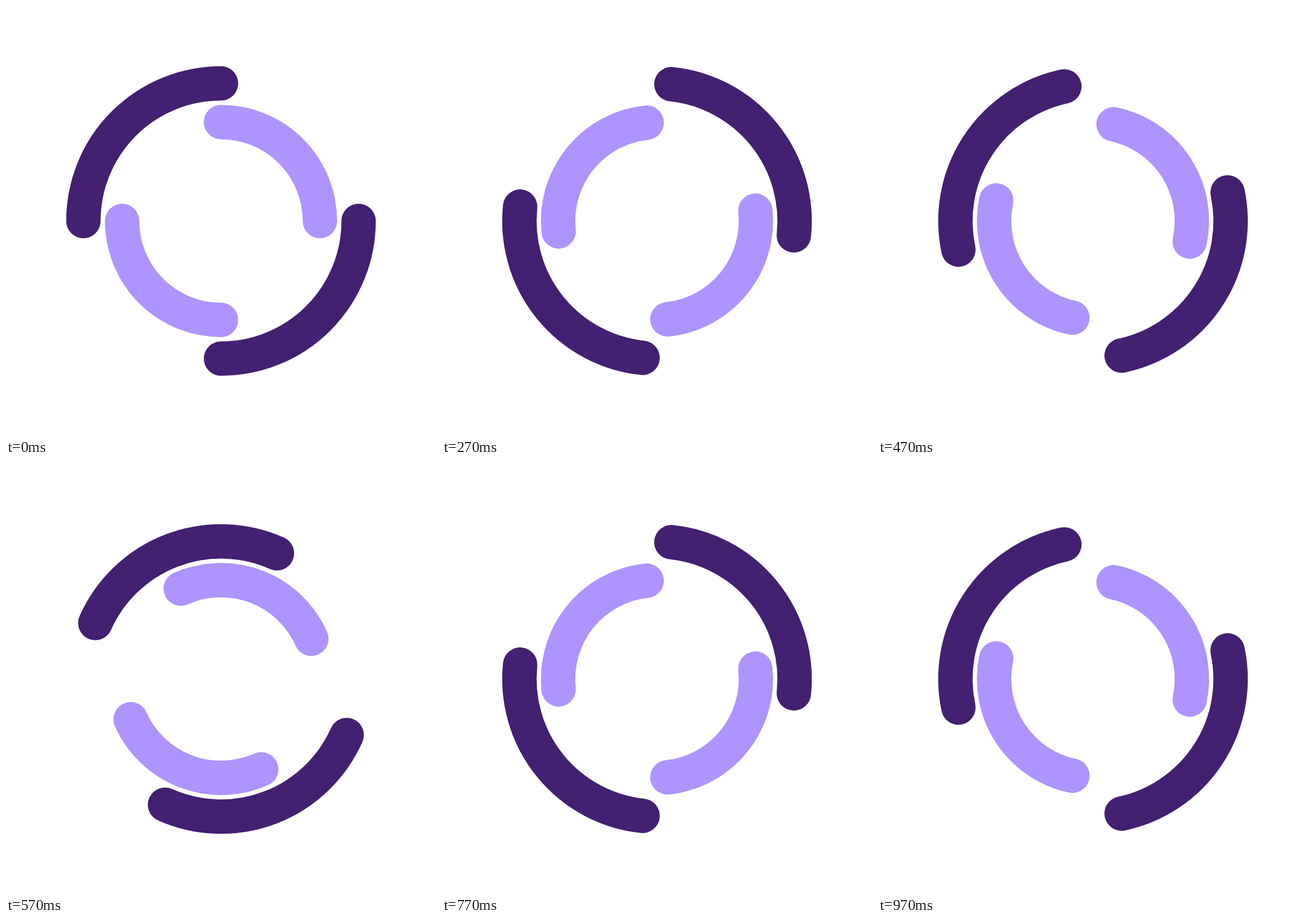
Animation, 748 px wide and 748 px high, one loop 1000 ms. Source, as an HTML page with a canvas:

```html
<!DOCTYPE html>
<html lang="en">
<head>
<meta charset="utf-8">
<title>Double ring spinner</title>
<style>
html, body { margin: 0; width: 100%; height: 100%; overflow: hidden; background: #fff; }
canvas { display: block; }
</style>
</head>
<body>
<canvas id="stage" width="748" height="748"></canvas>
<script>
const ctx = document.getElementById('stage').getContext('2d');
const SIZE = 748, UNIT = SIZE / 100, LOOP = 1000, STEPS = 30;
const QUARTER = Math.PI / 2;

// Two opposite quarter arcs with round ends
function ring(radius, color, angle) {
  ctx.strokeStyle = color;
  for (const start of [angle, angle + Math.PI]) {
    ctx.beginPath();
    ctx.arc(0, 0, radius, start, start + QUARTER);
    ctx.stroke();
  }
}

function draw(ms) {
  // 30 steps per second, with step times rounded to 10 ms
  const ticks = Math.floor((ms % LOOP) / 10);
  const step = Math.floor((ticks * 3 + 1) / 10);
  const turn = step / STEPS * 2 * Math.PI;

  ctx.setTransform(1, 0, 0, 1, 0, 0);
  ctx.fillStyle = '#fff';
  ctx.fillRect(0, 0, SIZE, SIZE);
  ctx.setTransform(UNIT, 0, 0, UNIT, SIZE / 2, SIZE / 2);
  ctx.lineWidth = 8;
  ctx.lineCap = 'round';
  ring(32, '#432071', turn);
  ring(23, '#ae94ff', QUARTER - turn);
}

let origin;
function frame(now) {
  origin ??= now;
  draw(Math.max(0, now - origin));
  requestAnimationFrame(frame);
}
draw(0);
requestAnimationFrame(frame);
</script>
</body>
</html>
```
